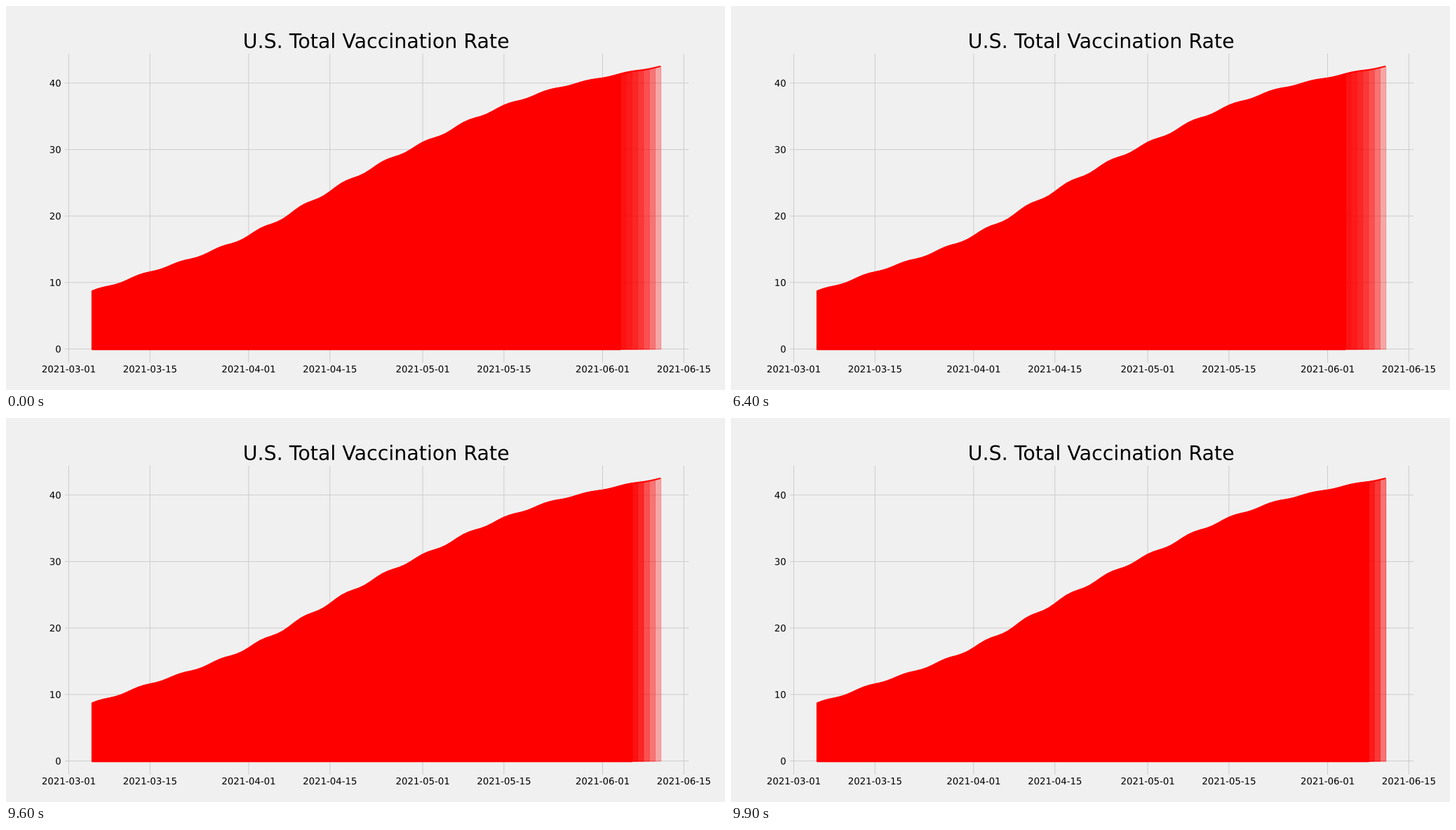
Animation of 1025 by 547 pixels, one loop 10 s. Source, as a matplotlib script:

```python
import numpy as np
import matplotlib.pyplot as plt
from matplotlib.animation import FuncAnimation
from matplotlib.patheffects import Normal

W, H = 1025, 547
DPI = W / 15
BG, GRID, RED, FULL = "#f0f0f0", "#cbcbcb", "red", "#fe0000"
ALPHA = 0.3
OPAQUE = 8          # this many stacked layers read as plain red
FRAMES = 100

plt.rcParams.update({
    "font.family": "DejaVu Sans",
    "font.size": 14,
    "text.hinting": "none",
})

last = 98
start = np.datetime64("2021-03-05")
days = np.arange(last + 1)

# Weekly trend, slowed and hurried by the rhythm of the week
trend = [7.6, 9.45, 11.57, 13.5, 15.8, 18.78, 22.26, 25.68,
         28.84, 31.73, 34.72, 37.21, 39.21, 40.62, 41.88, 42.97]
weeks = 7 * np.arange(len(trend)) - 4
warped = days - 0.42 * np.sin(2 * np.pi * (days - 3) / 7)
rate = np.interp(warped, weeks, trend)

fig = plt.figure(figsize=(W / DPI + 1e-6, H / DPI + 1e-6), dpi=DPI,
                 facecolor=BG)
ax = fig.add_axes([0.08, 0.07, 0.87, 0.81], facecolor=BG)
ax.set_axisbelow(True)
ax.grid(color=GRID, lw=1, snap=False)
ax.tick_params(length=0, pad=3.5)
for spine in ax.spines.values():
    spine.set(color=BG, linewidth=3)

ticks = [np.datetime64(f"2021-{m:02d}-{d:02d}")
         for m in range(3, 7) for d in (1, 15)]
ax.set_xticks([(t - start).astype(int) for t in ticks],
              [str(t) for t in ticks])
ax.set_yticks(range(0, 41, 10))
ax.set_xlim(-0.05 * last, 1.05 * last)
ax.set_ylim(-0.05 * rate[-1], 1.05 * rate[-1])
ax.set_title("U.S. Total Vaccination Rate", fontsize=30, pad=6)
ax.plot(days, rate, color=RED, lw=2, zorder=4, solid_capstyle="butt")

# Draw text as outlines, so it is not rounded to whole pixels
for text in [ax.title, *ax.get_xticklabels(), *ax.get_yticklabels()]:
    text.set_path_effects([Normal()])

areas = []


def add_area(a, b, **style):
    part = slice(a, b + 1)
    areas.append(ax.fill_between(days[part], rate[part], **style))


def layers(k, frame):
    """Fills over the strip that ends on day k: a full pass plus this one."""
    return last + 1 - k + max(0, frame - k)


def update(frame):
    while areas:
        areas.pop().remove()
    solid = max(k for k in range(1, last + 1) if layers(k, frame) >= OPAQUE)
    ends = list(range(solid + 1, last + 1)) + list(range(solid + 1, frame))
    for end in ends:
        add_area(solid - 1, end, color=RED, alpha=ALPHA, lw=1, zorder=2)
    # Many stacked edges add up to a wider outline
    add_area(0, solid, color=FULL, lw=2.5, zorder=3)
    return areas


anim = FuncAnimation(fig, update, frames=FRAMES, interval=100,
                     init_func=lambda: update(0), repeat=True,
                     repeat_delay=0, blit=False)
plt.show()
```
